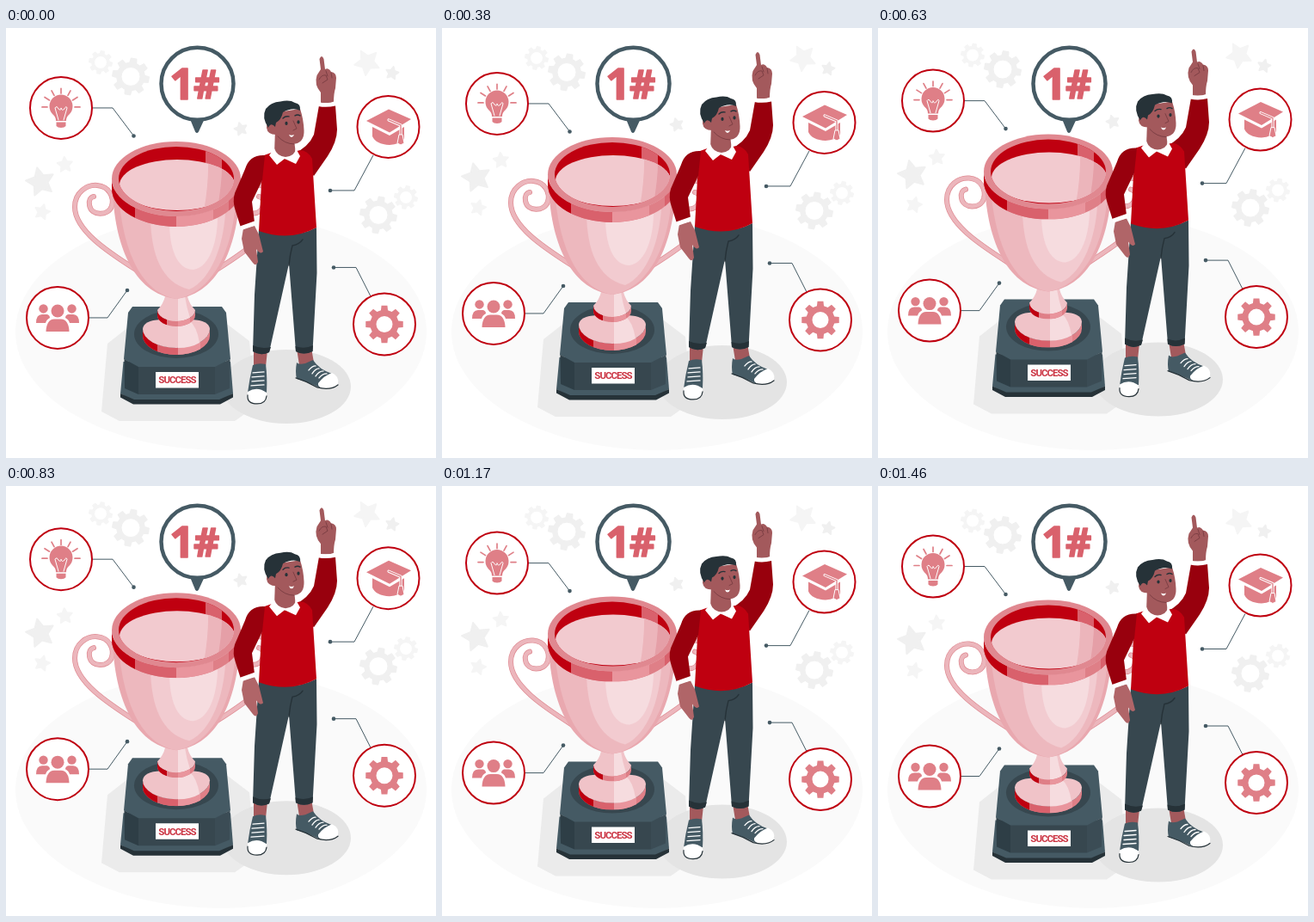
An HTML page that plays this animation: 500 px wide and 500 px high, repeating every 1.5 s.

```html
<!DOCTYPE html>
<html lang="en">
<head>
<meta charset="utf-8">
<title>Success</title>
<style>
  html, body { margin: 0; height: 100%; overflow: hidden; background: #fff; }
  svg { display: block; width: 100vw; height: 100vh; }
  .red { fill: #bf0010; }
  .sleeve { fill: #98000d; }
  .pink { fill: #df7f87; }
  .white { fill: #fff; }
  .slate { fill: #455a64; }
  .dark { fill: #37474f; }
  .ink { fill: #263238; }
  .skin { fill: #a3595c; }
  .ring { fill: #fff; stroke: #bf0010; stroke-width: 2; }
  .link { fill: none; stroke: #455a64; stroke-width: 1; }
  .line { fill: none; stroke-linecap: round; stroke-linejoin: round; }
</style>
</head>
<body>
<svg viewBox="0 0 500 500">
  <defs>
    <clipPath id="opening"><ellipse cx="198" cy="175.5" rx="67" ry="37.5"/></clipPath>
    <clipPath id="inside"><ellipse cx="199" cy="182.5" rx="67" ry="29.5"/></clipPath>
    <clipPath id="band"><path d="M123 175.5A75 43.5 0 0 0 273 175.5V187A75 44 0 0 1 123 187Z"/></clipPath>
    <clipPath id="collar"><path d="M176 328A22 13 0 0 0 220 328V334A22 13 0 0 1 176 334Z"/></clipPath>
    <clipPath id="foot"><path d="M159 350A39 22 0 0 0 237 350V358A39 22 0 0 1 159 358Z"/></clipPath>
    <path id="curl" class="line" d="M151 281C118 260 80 235 80 208C80 191 94 182 106 183C120 184 126 197 123 207C119 219 99 219 97 206C96 201 98 197 102 196"/>
    <g id="handle">
      <use href="#curl" stroke="#df8a92" stroke-width="6"/>
      <use href="#curl" stroke="#ecb6bc" stroke-width="4.6"/>
    </g>
    <g id="member">
      <circle cx="43.5" cy="326.5" r="5.2"/>
      <path d="M35 343Q35 333 42 333H48Q51 334 51 337Q47 339 46 343Z"/>
    </g>
    <path id="rays" d="M42 92H48M45 80.5L50.500 84M53 73L56 78.500"/>
  </defs>

  <ellipse cx="250" cy="353" rx="239" ry="138" fill="#fafafa"/>

  <g id="floating">
    <g id="backdrop" stroke-linejoin="round"></g>
    <path d="M118 367L146 345H258L283 364L290 440L266 457H132L111 446Z" fill="#ebebeb"/>
    <ellipse cx="326" cy="417" rx="75" ry="43" fill="#e4e4e4"/>

    <!-- icons -->
    <path class="link" d="M100 93H124L148.500 125.500M427 148L405 189H377M96 337H118L141 305M424 312L407 278.500H381"/>
    <g class="slate">
      <circle cx="148.500" cy="125.500" r="2.300"/><circle cx="377" cy="189" r="2.300"/>
      <circle cx="141" cy="305" r="2.300"/><circle cx="381" cy="278.500" r="2.300"/>
    </g>
    <g class="ring">
      <circle cx="64" cy="93" r="36"/><circle cx="444.500" cy="115" r="36"/>
      <circle cx="60" cy="337" r="36"/><circle cx="440" cy="344.500" r="36"/>
    </g>
    <g class="pink">
      <path d="M58 108Q58 103 54 100A13.500 13.500 0 1 1 74 100Q70 103 70 108Z"/>
      <path d="M58.500 109.500H69.500V114Q68 116 64 116T58.500 114Z"/>
      <g class="line" stroke="#df7f87" stroke-width="1.700">
        <use href="#rays"/><use href="#rays" transform="matrix(-1 0 0 1 128 0)"/><path d="M64 70.500V76"/>
      </g>
      <path class="line" d="M61 107L57 93Q59 90 61 94Q64 97 64 93Q65 97 68 94Q70 90 71 93L67 107" stroke="#fff"/>

      <path d="M419 108L445 94.500L471 106L446 121.500Z"/>
      <path d="M426 115L446 125L463 115V129Q458 135 446 136Q430 135 426 126Z"/>
      <path class="line" d="M445 107L459 113V128" stroke="#fff" stroke-width="3.200"/>
      <path class="line" d="M445 107L459 113V128" stroke="#df7f87" stroke-width="1.300"/>
      <path d="M457 124H461L463 134L459 136L455 134Z" stroke="#fff"/>

      <use href="#member"/><use href="#member" transform="matrix(-1 0 0 1 120 0)"/>
      <circle cx="60" cy="329" r="7.500"/>
      <path d="M46.500 353Q47 339 56 338.500H64Q73 339 73.500 353Z"/>
    </g>
    <g id="cog" class="pink"></g>

    <!-- pedestal -->
    <path class="slate" d="M136.500 388L133 425L148 433H249L264 425L261 388Z"/>
    <path class="ink" d="M133 425L149 432H248L264 425V429.500L249 437.500H148L133 429.500Z"/>
    <path class="slate" d="M147 324H251L256 331L261 385L243 394H154L137 385L142 331Z"/>
    <path d="M137.500 385L154 394V426L138 419Z" fill="#2e3e46"/>
    <path d="M260.500 385L243 394V426L260 419Z" fill="#3b4c55"/>
    <path class="dark" d="M154 394H243V426H154Z"/>
    <ellipse class="dark" cx="198" cy="356" rx="49" ry="28"/>
    <path class="white" d="M174 400H224V418.500H174Z"/>
    <text x="199" y="413.500" text-anchor="middle" font-family="Roboto, sans-serif" font-weight="700" font-size="11.500" letter-spacing="-1" fill="#cb3342">SUCCESS</text>

    <!-- trophy -->
    <use href="#handle"/><use href="#handle" transform="matrix(-1 0 0 1 396 0)"/>
    <g clip-path="url(#foot)">
      <path d="M159 340H237V382H159Z" fill="#df7f87"/>
      <path class="red" d="M159 340H176V382H159Z"/>
      <path d="M176 340H200V382H176Z" fill="#d9616c"/>
      <path d="M200 340H226V382H200Z" fill="#e9959d"/>
    </g>
    <path d="M180 339Q160 340 159 350A39 22 0 0 0 237 350Q236 340 216 339Z" fill="#f0c3c8"/>
    <path d="M200 340H213Q222 347 225 366Q215 372 200 372Z" fill="#f6dcdf"/>
    <path d="M185 312H211Q213 321 220 328A22 13 0 0 1 176 328Q183 321 185 312Z" fill="#f0c3c8"/>
    <path d="M200 312H208Q210 325 214 337Q207 341 200 341Z" fill="#f6dcdf"/>
    <g clip-path="url(#collar)">
      <path d="M175 325H221V350H175Z" fill="#df7f87"/>
      <path class="red" d="M175 325H187V350H175Z"/>
      <path d="M200 325H214V350H200Z" fill="#e9959d"/>
    </g>

    <path d="M124 188C126 250 147 309 198 315C249 309 270 250 272 188Z" fill="#e9a8af"/>
    <path d="M132 205C138 260 157 308 198 315C240 308 264 258 267 200Z" fill="#edb8be"/>
    <path d="M168 222C169 262 180 296 213 304C240 292 253 250 255 215Z" fill="#f2cbd0"/>
    <path d="M190 225C190 255 198 281 218 281C238 278 246 245 246 220Z" fill="#f6dcdf"/>
    <g clip-path="url(#band)">
      <path d="M123 170H274V236H123Z" fill="#df7f87"/>
      <path class="red" d="M123 170H150V236H123Z"/>
      <path d="M150 170H198V236H150Z" fill="#d9616c"/>
      <path d="M198 170H241V236H198Z" fill="#e9959d"/>
      <path d="M259 170H274V236H259Z" fill="#d9616c"/>
    </g>
    <ellipse cx="198" cy="175.500" rx="75" ry="43.500" fill="#e08890"/>
    <g clip-path="url(#opening)">
      <path class="red" d="M130 135H267V215H130Z"/>
      <path d="M232 135H251V215H232Z" fill="#d9616c"/>
      <g clip-path="url(#inside)">
        <path d="M130 150H267V213H130Z" fill="#f2cacf"/>
        <path d="M235 150H267V213H230Q236 180 235 150Z" fill="#ecb5bb"/>
        <path d="M251 150H267V213H245Q252 180 251 150Z" fill="#e59fa7"/>
      </g>
    </g>

    <!-- shoes and legs -->
    <path class="skin" d="M288 375H304L302 394H288ZM338 373L355 372L358 389L341 392Z"/>
    <path class="slate" d="M287 392Q294 389 302 391Q304 406 303 424H281Q283 408 287 392Z"/>
    <path class="white" d="M281 423Q292 416 303 424Q304 436 292 436.500Q280 436 281 423Z"/>
    <path class="line" d="M281 427Q280 437 292 437Q302 437 303 428" stroke="#263238" stroke-width="1.200"/>
    <path class="slate" d="M338 389Q340 392 348 390L357 386Q364 397 379 402L366 419Q350 411 338 408Q336 400 338 389Z"/>
    <path class="white" d="M379 401Q388 405 386 414Q379 420 368 419Q362 417 363 413Q370 404 379 401Z"/>
    <path class="line" d="M337 407Q350 411 362 418Q377 422 386 415" stroke="#263238" stroke-width="1.200"/>
    <path class="line" d="M287 401L300 400M286 406L300 405M286 411L300 410M285 416L300 415M352 398Q356 393 360 393M356 402Q360 396 364 396M360 405Q364 399 369 399M364 407Q368 402 373 402" stroke="#fff" stroke-width="1.300"/>
    <path class="dark" d="M294 234Q330 248 361 232L361.500 285L356.500 376Q346 381 337 376L329 274L306 377Q296 382 287 376L289 310Z"/>
    <path class="ink" d="M287 369Q297 374 308 371L306 377Q296 382 287 376ZM336.500 370Q347 374 357 369L356.500 376Q346 381 337 376Z"/>
    <path class="line" d="M345 246Q341 252 333 253Q330 264 329 276" stroke="#263238" stroke-width="1.400"/>

    <!-- raised arm, torso, lowered arm -->
    <path class="skin" d="M366 87V75Q358 66 361.500 55L366 48L364.500 36Q367 30 369.500 36L371 48Q375 46 378 51Q384 52 384 58L383 70Q381 76 381 87Z"/>
    <path class="line" d="M364 60Q367 54 372 55L374 60L368 64M372 50L374 56M378 52L379 58" stroke="#7d3f44"/>
    <path class="sleeve" d="M364 90H383L385 118Q385 132 374 149L358 172L335 146Q352 138 358 124Z"/>
    <path class="white" d="M363.500 86Q373 89 383 85V90.500Q373 93 363 91Z"/>
    <path class="red" d="M300 148L314 143H338Q349 140 356 152L361 232Q330 249 294 236L297 180Z"/>
    <path d="M289 230L294 240L299 260Q296 264 291 257L293 272Q291 278 287 273L277 260L274 245L276 233Z" fill="#b06568"/>
    <path class="sleeve" d="M301 148Q283 147 278 164L266 192Q263 202 267 213L273 232L289 226L286 202L298 177Z"/>
    <path class="white" d="M272 230.500L289 224.500L290 229.500L274 235Z"/>

    <!-- head -->
    <path class="skin" d="M313 118L312 146L325 153L337 147L335 130Z"/>
    <path class="white" d="M312 140L306 148L315 159L324 152L337 158L342 149L337 140Q336 149 325 150Q315 149 312 140Z"/>
    <path class="skin" d="M308 107Q312 97 322 97L342 94Q346 106 346.500 119Q347 132 337 134.500Q324 136 314 124Q304 124 303 116Q303 109 308 107Z"/>
    <path class="line" d="M316 126Q324 135 335 135" stroke="#7d3f44"/>
    <path class="ink" d="M305 116Q297 104 302 94Q308 86 319 85.500Q330 83 336 87Q343 88 342 96Q333 92 322 98Q320 107 314 110L313 115Q308 109 305 116Z"/>
    <g class="ink"><ellipse cx="326" cy="111" rx="1.600" ry="2.100"/><ellipse cx="340" cy="109.500" rx="1.600" ry="2.100"/></g>
    <path class="line" d="M322 105Q325 102 329 103M336 102Q339 100 342 102" stroke="#263238" stroke-width="1.400"/>
    <path class="line" d="M334 108L338 117L334 119" stroke="#7d3f44"/>
    <path class="white" d="M329 124Q332 125.500 335 124Q334 127 332 127T329 124Z"/>
  </g>

  <path class="slate" d="M212 101H233L224 120.500Q222 123.500 220 120.500Z"/>
  <circle cx="222.500" cy="64.800" r="42" fill="#fff" stroke="#455a64" stroke-width="4.500"/>
  <text font-family="Noto Sans, Open Sans, sans-serif" font-weight="700" font-size="51" fill="#d9616c" stroke="#d9616c" stroke-width="1.500" stroke-linejoin="round"><tspan x="190" y="82.500">1</tspan><tspan x="218" y="81.500" font-size="47">#</tspan></text>
</svg>
<script>
  const byId = id => document.getElementById(id);
  const point = (x, y, r, deg) => {
    const a = deg * Math.PI / 180;
    return `${(x + r * Math.cos(a)).toFixed(2)} ${(y + r * Math.sin(a)).toFixed(2)}`;
  };

  function gear(x, y, r, hole, turn = 0) {
    const corners = [];
    for (let tooth = turn; tooth < turn + 360; tooth += 45) {
      for (const [deg, k] of [[-14, .76], [-9, 1], [9, 1], [14, .76]])
        corners.push(point(x, y, r * k, tooth + deg));
    }
    return `<path fill-rule="evenodd" d="M${corners.join('L')}ZM${x - hole} ${y}a${hole} ${hole} 0 1 0 ${2 * hole} 0a${hole} ${hole} 0 1 0 ${-2 * hole} 0Z"/>`;
  }

  function star(x, y, r, turn) {
    const corners = [];
    for (let i = 0; i < 10; i++)
      corners.push(point(x, y, i % 2 ? r * .5 : r, turn - 90 + i * 36));
    return `<path stroke-width="2" d="M${corners.join('L')}Z"/>`;
  }

  const tinted = (color, ...shapes) => `<g fill="${color}" stroke="${color}">${shapes.join('')}</g>`;

  byId('cog').innerHTML = gear(440, 344.5, 22, 9.5);
  byId('backdrop').innerHTML =
    tinted('#f0f0f0', gear(145, 56.5, 21.5, 11, 10), gear(433, 217.5, 21.5, 11, 10),
      star(40, 179, 17, -13), star(449, 52.5, 7.5, 12), star(273, 117.5, 7.5, -15)) +
    tinted('#f5f5f5', gear(110, 40, 13.5, 7.5, 10), gear(465, 197, 13.5, 7.5, 10),
      star(420, 40, 15, -29), star(68.5, 159, 9, -5), star(42, 214, 9, 15));

  // 36 steps per 1.5 s loop: 10 px up and back at constant speed, lowest on the last step
  const start = performance.now(), floating = byId('floating');
  function draw() {
    const step = (Math.floor((performance.now() - start + 5) * 24 / 1000) + 1) % 36;
    const rise = 10 * (1 - Math.abs(step / 18 - 1));
    floating.setAttribute('transform', `translate(0 ${0.5 - rise})`);
    requestAnimationFrame(draw);
  }
  draw();
</script>
</body>
</html>
```
